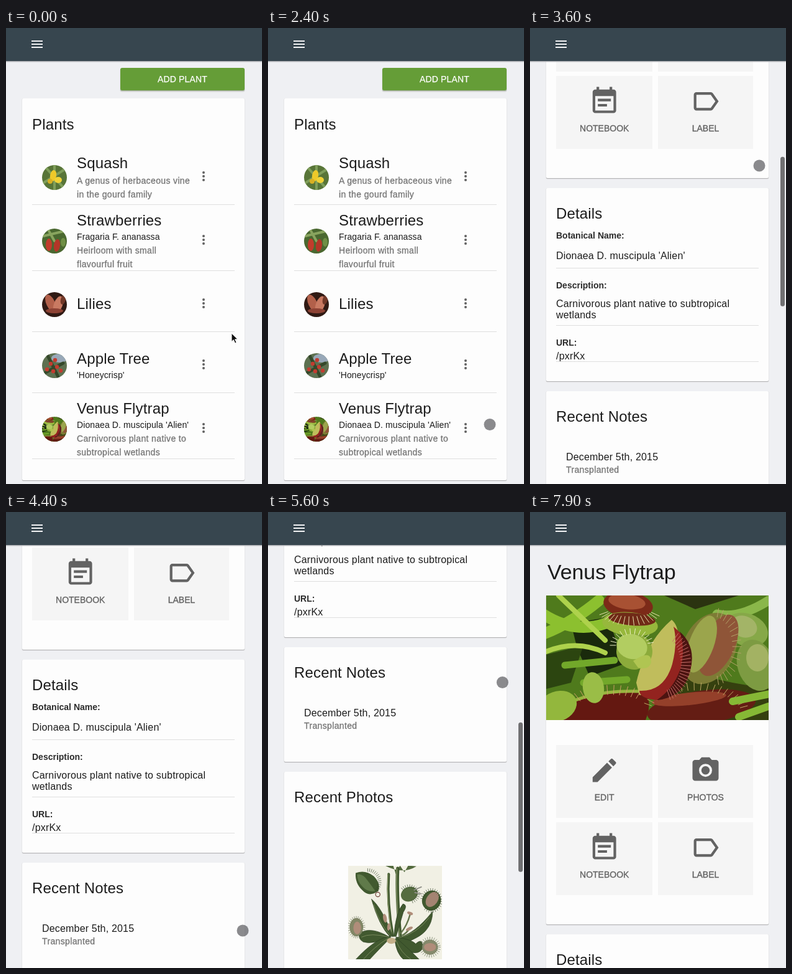
Recreate the animation shown at these times as an HTML page. Size 412 px wide and 732 px high, loop 8 s.

```html
<!DOCTYPE html>
<html lang="en">
<head>
<meta charset="utf-8">
<title>Plants</title>
<style>
  html, body { margin: 0; width: 100%; height: 100%; overflow: hidden; background: #eff0f3; }
  svg { display: block; width: 100vw; height: 100vh; }
  text { font-family: "Liberation Sans", Arial, sans-serif; fill: #1c1c1c; }
  .h1 { font-size: 34px; letter-spacing: -.1px; }
  .h2 { font-size: 24px; letter-spacing: .15px; }
  .body { font-size: 16px; letter-spacing: .18px; }
  .small { font-size: 14px; letter-spacing: .1px; }
  .bold { font-size: 14px; font-weight: bold; fill: #2c2c2c; }
  .note { font-size: 14px; letter-spacing: .36px; fill: #757575; stroke: #757575; stroke-width: .3px; }
  .tile { font-size: 14px; fill: #636363; stroke: #636363; stroke-width: .35px; text-anchor: middle; }
  .btn { font-size: 14px; letter-spacing: .14px; fill: #fff; stroke: #fff; stroke-width: .25px; text-anchor: middle; }
</style>
</head>
<body>
<svg id="stage" viewBox="0 0 412 732"></svg>
<script>
const LOOP = 8000;
const stage = document.getElementById('stage');

// Drawing helpers
const text = (cls, x, y, s) => `<text class="${cls}" x="${x}" y="${y}">${s}</text>`;
const rect = (x, y, w, h, fill, r = 0) =>
  `<rect x="${x}" y="${y}" width="${w}" height="${h}" rx="${r}" fill="${fill}"/>`;
const oval = (x, y, rx, ry, fill, turn = 0) =>
  `<ellipse rx="${rx}" ry="${ry}" fill="${fill}" transform="translate(${x} ${y}) rotate(${turn})"/>`;
const line = (d, color, w = 1) =>
  `<path d="${d}" fill="none" stroke="${color}" stroke-width="${w}" stroke-linecap="round"/>`;
const shape = (d, fill) => `<path d="${d}" fill="${fill}"/>`;
const rule = y => rect(42, y, 326, 1, '#dfdfdf');
const use = (id, x, y, w, h) => `<use href="#${id}" x="${x}" y="${y}" width="${w}" height="${h}"/>`;

const card = (top, bottom) =>
  rect(25.5, top, 359, bottom - top + 1.5, '#dcdcde', 2) +
  rect(26, top + 2, 358, bottom - top - 1, '#b4b4b6', 2) +
  rect(26, top, 358, bottom - top, '#fdfdfd', 2);

const button = (x, y, w, label) =>
  rect(x - .5, y + 1, w + 1, 37.5, '#d0d2d0', 3) + rect(x, y + 1, w, 36, '#a0ab96', 3) +
  rect(x, y, w, 36, '#659d37', 3) + text('btn', x + w / 2, y + 23, label);

// Teeth along an elliptic arc, angles in degrees
function teeth(x, y, rx, ry, from, to, count, len, color, w = 1) {
  let d = '';
  for (let i = 0; i < count; i++) {
    const a = (from + (to - from) * i / (count - 1)) * Math.PI / 180;
    const c = Math.cos(a), s = Math.sin(a);
    d += `M${(x + rx * c).toFixed(1)} ${(y + ry * s).toFixed(1)}l${(len * c).toFixed(1)} ${(len * s).toFixed(1)}`;
  }
  return line(d, color, w);
}

// Pictures
const flytrapPhoto = [
  rect(0, 0, 358, 200, '#4f7a1c'),
  shape('M40 45L100 35 125 110 70 130 50 85Z', '#1a2a0c'),
  shape('M190 0H310L240 22Z', '#2b3310'),
  shape('M0 95L60 80 40 140 0 150Z', '#2c4510'),
  shape('M210 120L300 140 358 150V200H180Z', '#35400f'),
  line('M-5 30Q45 62 95 45M-5 62Q40 45 85 8', '#8cc02f', 18),
  line('M20 0L95 72M0 90Q50 70 95 92', '#aed24c', 8),
  line('M30 112L110 104M60 140L130 135', '#72a82a', 11),
  line('M358 8Q310 38 275 30', '#8ab74a', 15),
  oval(322, 55, 36, 26, '#86a848', 20), oval(318, 50, 22, 17, '#a3b467', 20),
  oval(338, 112, 30, 42, '#7d9b42', -18), oval(340, 100, 18, 22, '#a3b263'),
  oval(262, 85, 42, 60, '#7d7c35', 25), oval(277, 80, 26, 53, '#8f5538', 25), oval(250, 78, 20, 48, '#9ba54c', 20),
  teeth(270, 82, 30, 48, -80, 80, 17, 14, '#b3a268'),
  oval(132, 15, 40, 21, '#7c2a18', 8), oval(130, 10, 30, 12, '#a85133', 8),
  oval(135, 46, 45, 19, '#97b83c', 6), oval(138, 38, 38, 10, '#702a17', 5),
  teeth(135, 22, 38, 12, 25, 160, 15, 14, '#e8e2ac'),
  shape('M0 190Q60 150 150 152Q175 162 160 200H0Z', '#641811'),
  line('M0 192Q60 150 152 154', '#98b43f', 5),
  teeth(105, 205, 80, 46, 190, 300, 17, 15, '#cf9f68'),
  oval(18, 178, 32, 24, '#93b73d', -20), oval(76, 148, 17, 25, '#9abd47', -8),
  oval(250, 180, 88, 27, '#641d14', -8), oval(230, 166, 60, 10, '#94402a', -6),
  teeth(240, 190, 75, 38, 200, 345, 20, 12, '#bfa966'),
  line('M300 170L360 158M310 195L358 178', '#86b835', 12),
  shape('M145 140Q160 75 202 39Q222 55 205 115Q195 155 150 160Z', '#c0bd5c'),
  shape('M205 50Q242 80 232 120Q220 165 178 168Q150 165 150 153Q190 155 203 110Q212 75 205 50Z', '#93231f'),
  shape('M215 58Q242 82 232 120Q220 165 178 168Q207 148 217 115Q224 85 215 58Z', '#4c1411'),
  teeth(185, 110, 32, 44, -55, 72, 23, 16, '#c8706a'),
  oval(142, 90, 29, 29, '#8cab3b', 15), oval(138, 82, 25, 20, '#b2cd61', 15),
  shape('M140 105Q170 85 169 108Q165 120 148 116Z', '#b0c552'),
  teeth(138, 80, 26, 18, 180, 350, 13, 9, '#eef0c8')
].join('');

const green = '#41592f', dark = '#26391f', pale = '#8c9a6b', pink = '#b08d7a';
const leaf = d => shape(d, green) + line(d, dark, 1);
const botanical = [
  rect(0, 0, 250, 250, '#f1f0e4'),
  shape('M98 0Q145 25 182 2L160 0 150 18 138 0 127 23 120 0Z', '#536a3e'),
  line('M132 8Q128 80 140 198', green, 9), line('M130 8Q126 80 138 198', pale, 2),
  line('M108 23Q103 100 119 186', green, 7), line('M106 23Q101 100 117 186', pale, 2),
  leaf('M112 190Q82 160 62 89Q90 112 118 186Z'),
  leaf('M122 188Q126 126 146 102Q160 105 147 124Q138 155 128 188Z'),
  leaf('M130 192Q175 185 225 122Q225 170 180 193Q150 210 136 198Z'),
  leaf('M110 190Q60 160 30 180Q26 195 40 203Q65 212 112 188Z'),
  leaf('M128 190Q170 197 180 208Q200 190 198 220Q190 237 165 230Q145 220 128 196Z'),
  leaf('M110 188Q70 195 18 252H55Q80 225 113 192Z'),
  leaf('M124 196Q128 235 150 252H192Q165 225 130 194Z'),
  line('M110 184Q82 150 68 104M136 192Q185 180 216 138M108 190Q60 178 36 190M106 194Q70 215 40 250M128 200Q140 232 168 250', pale, 1.2),
  line('M140 180Q157 160 165 130M145 185Q155 180 163 168', '#62734a', 4),
  oval(98, 140, 5, 12, pink, -10), oval(163, 168, 10, 4, pink, -25),
  oval(165, 127, 8, 4, pink, 20), oval(108, 163, 4, 10, pink, 5),
  oval(115, 200, 12, 8, '#c4b08a'),
  shape('M20 20Q45 10 68 28Q88 48 80 68Q55 85 38 66Q18 48 20 20Z', green),
  shape('M24 24Q38 20 52 40Q66 58 72 68Q52 72 38 56Q24 42 24 24Z', '#607a4a'),
  teeth(52, 44, 28, 28, -90, 40, 15, 8, dark),
  '<circle cx="79" cy="77" r="6" fill="none" stroke="#74443c" stroke-width="2"/>',
  oval(163, 76, 23, 19, '#566c40', -25), teeth(163, 76, 20, 17, -140, 70, 17, 8, dark),
  line('M176 65L195 57M178 72L195 75', '#909088', 3),
  oval(222, 93, 25, 27, green, 20), oval(224, 90, 15, 22, '#a48472', 35),
  teeth(222, 93, 21, 24, -170, 130, 25, 8, dark),
  oval(22, 164, 18, 24, '#828766'), oval(24, 166, 10, 17, pink), teeth(22, 164, 17, 23, 0, 350, 27, 6, '#505c40'),
  oval(218, 217, 21, 20, '#858a6c'), oval(218, 217, 16, 11, pink), teeth(218, 217, 20, 19, 0, 350, 27, 8, '#505c40')
].join('');

const thumbs = [
  rect(-20, -20, 40, 40, '#587538') + line('M-20 10L18 -14M-14 -16L16 18M0 -20V20', '#7f9e5a', 4) +
    oval(-2, -3, 5, 9, '#eec92a', 10) + oval(6, 4, 6, 5, '#f0d236') + oval(-7, 6, 4, 4, '#d8b024'),
  rect(-20, -20, 40, 40, '#4a6830') + line('M-18 -8L16 -16M-10 -18L0 0', '#88a45e', 4) +
    oval(-9, 6, 5, 10, '#c23c2c') + oval(4, 7, 5, 10, '#b33628', 8) + oval(14, 2, 4, 7, '#6f8f45'),
  rect(-20, -20, 40, 40, '#301a14') + oval(-6, -2, 7, 15, '#b2604a', -25) + oval(6, 0, 7, 14, '#c97a62', 20) +
    oval(0, 10, 14, 4, '#8d4234') + oval(14, -8, 4, 8, '#713828', 15),
  rect(-20, -20, 40, 40, '#5d7050') + oval(8, -12, 13, 7, '#98a8b8') + line('M-20 14L14 -4M-12 -18L6 18', '#34482a', 5) +
    [[-6, -3], [4, 2], [-2, 9], [10, 8], [-12, 6], [1, -9]].map(p => oval(p[0], p[1], 3.2, 3.2, '#c23c30')).join(''),
  use('flytrap', -20, -20, 40, 40)
];

const icons = {
  EDIT: 'M3 17.25V21h3.75L17.81 9.94l-3.75-3.75L3 17.25zM20.71 7.04a1 1 0 0 0 0-1.41l-2.34-2.34a1 1 0 0 0-1.41 0l-1.83 1.83 3.75 3.75 1.83-1.83z',
  PHOTOS: 'M9 2L7.17 4H4a2 2 0 0 0-2 2v12a2 2 0 0 0 2 2h16a2 2 0 0 0 2-2V6a2 2 0 0 0-2-2h-3.17L15 2zM12 7a5 5 0 1 1 0 10a5 5 0 1 1 0-10zM12 8.8a3.2 3.2 0 1 0 0 6.4a3.2 3.2 0 1 0 0-6.4z',
  NOTEBOOK: 'M17 10H7v2h10zM19 3h-1V1h-2v2H8V1H6v2H5a2 2 0 0 0-2 2v14a2 2 0 0 0 2 2h14a2 2 0 0 0 2-2V5a2 2 0 0 0-2-2zM19 19H5V8h14zM14 14H7v2h7z',
  LABEL: 'M17.63 5.84A2 2 0 0 0 16 5H5a2 2 0 0 0-2 2v10a2 2 0 0 0 2 2h11a2 2 0 0 0 1.63-.84L22 12zM16 17H5V7h11l3.55 5z'
};

const tile = (x, y, w, cx, label) =>
  rect(x, y, w, 117, '#f5f5f5') +
  `<path d="${icons[label]}" fill="#636363" fill-rule="evenodd" transform="translate(${cx - 25.2} ${y + 15.5}) scale(2.1)"/>` +
  text('tile', cx, y + 89, label);

// Screens
const plants = [
  { y: 240, rule: 283, title: ['Squash', 225], note: ['A genus of herbaceous vine', 250, 'in the gourd family'] },
  { y: 342, rule: 389, title: ['Strawberries', 317], latin: ['Fragaria F. ananassa', 340], note: ['Heirloom with small', 362, 'flavourful fruit'] },
  { y: 444, rule: 487, title: ['Lilies', 451] },
  { y: 542, rule: 585, title: ['Apple Tree', 539], latin: ["'Honeycrisp'", 562] },
  { y: 644, rule: 691, title: ['Venus Flytrap', 619], latin: ["Dionaea D. muscipula 'Alien'", 642], note: ['Carnivorous plant native to', 664, 'subtropical wetlands'] }
];

const plantRow = (p, i) =>
  `<g transform="translate(78 ${p.y})"><g clip-path="url(#round)">${thumbs[i]}</g></g>` +
  text('h2', 114, p.title[1], p.title[0]) +
  (p.latin ? text('small', 114, p.latin[1], p.latin[0]) : '') +
  (p.note ? text('note', 114, p.note[1], p.note[0]) + text('note', 114, p.note[1] + 22, p.note[2]) : '') +
  [-6, 0, 6].map(d => oval(318, p.y - 2 + d, 2, 2, '#636363')).join('') + rule(p.rule);

const listScreen = button(184, 64, 200, 'ADD PLANT') + card(113, 726) +
  text('h2', 42, 163, 'Plants') + plants.map(plantRow).join('');

const detailScreen = [
  text('h1', 28, 108, 'Venus Flytrap'),
  card(134, 662), use('flytrap', 26, 134, 358, 200),
  tile(42, 374, 155, 119.7, 'EDIT'), tile(206, 374, 153, 282.5, 'PHOTOS'),
  tile(42, 498, 155, 119.7, 'NOTEBOOK'), tile(206, 498, 153, 282.5, 'LABEL'),
  card(678, 988), text('h2', 42, 727, 'Details'),
  text('bold', 42, 759, 'Botanical Name:'), text('body', 42, 792, "Dionaea D. muscipula 'Alien'"), rule(806),
  text('bold', 42, 839, 'Description:'), text('body', 42, 869, 'Carnivorous plant native to subtropical'),
  text('body', 42, 887, 'wetlands'), rule(898),
  text('bold', 42, 931, 'URL:'), text('body', 42, 953, '/pxrKx'), rule(956),
  card(1004, 1188), text('h2', 42, 1053, 'Recent Notes'),
  text('body', 58, 1115, 'December 5th, 2015'), text('note', 58, 1135, 'Transplanted'),
  card(1204, 1933), text('h2', 42, 1253, 'Recent Photos'),
  use('botanical', 129, 1355, 151, 150), use('flytrap', 129, 1568, 151, 150)
].join('');

const photosScreen = [
  card(66, 199), text('h2', 42, 115, 'Upload or capture a photo'),
  button(50, 136, 166, 'TAKE/UPLOAD PHOTO'), rect(42, 178, 326, 5, '#c7d3e0'),
  card(207, 960), text('h2', 56, 256, 'Photos of Venus Flytrap'),
  use('botanical', 87, 300, 250, 250), use('flytrap', 87, 613, 250, 250)
].join('');

stage.innerHTML = `
  <defs>
    <clipPath id="round"><circle r="20"/></clipPath>
    <symbol id="flytrap" viewBox="0 0 358 200" preserveAspectRatio="xMidYMid slice">${flytrapPhoto}</symbol>
    <symbol id="botanical" viewBox="0 0 250 250" preserveAspectRatio="xMidYMid slice">${botanical}</symbol>
  </defs>
  ${rect(0, 0, 412, 732, '#eff0f3')}
  <g id="list">${listScreen}</g><g id="detail">${detailScreen}</g><g id="photos">${photosScreen}</g>
  ${rect(0, 53, 412, 1.5, '#b2b4b8')}${rect(0, 0, 412, 53, '#37464f')}
  ${[20, 25, 30].map(y => rect(41, y, 18, 2, '#f0f1f3')).join('')}
  <rect id="bar" x="403" width="7" rx="3.5" fill="#707072"/>
  <circle id="touch" r="9.5" fill="#4a4a4e" fill-opacity=".64"/>
  <path id="arrow" d="M0 0V13.5L3.2 10.6 5.6 16 8 15 5.6 9.8H10Z" fill="#0c0c0c" stroke="#fff" stroke-width="1"/>`;

const [list, detail, photos, bar, touch, arrow] =
  ['list', 'detail', 'photos', 'bar', 'touch', 'arrow'].map(id => document.getElementById(id));

// Motion: rows of [time, ...values], eased between rows
const pointer = [
  [0, 363, 490], [400, 363, 500], [1400, 359, 612], [1800, 357, 634], [2850, 357, 638],
  [3080, 372, 665], [3600, 369, 221], [3750, 369, 200], [4400, 381, 672], [4500, 382, 672],
  [4900, 382, 474], [5250, 380, 230], [5500, 378, 230], [6000, 372, 640], [6300, 315, 485], [6650, 315, 492],
  [7050, 150, -20]
];
const detailScroll = [
  [3060, 0], [3100, 1], [3600, 421], [3750, 441], [4500, 441], [4900, 636], [5250, 880], [5500, 880], [6000, 0]
];

function at(rows, t) {
  const next = rows.findIndex(r => r[0] > t);
  if (next === 0) return rows[0].slice(1);
  if (next < 0) return rows[rows.length - 1].slice(1);
  const a = rows[next - 1], b = rows[next];
  const u = (t - a[0]) / (b[0] - a[0]), e = u * u * (3 - 2 * u);
  return a.slice(1).map((v, i) => v + (b[i + 1] - v) * e);
}

const show = (el, on) => el.setAttribute('display', on ? 'inline' : 'none');
const move = (el, x, y) => el.setAttribute('transform', `translate(${x} ${y})`);

function draw(t) {
  const screen = t < 2850 ? list : t < 6450 || t >= 7200 ? detail : photos;
  [list, detail, photos].forEach(s => show(s, s === screen));

  const scroll = screen === detail ? Math.round(at(detailScroll, t)[0]) : 0;
  move(screen, 0, -scroll);

  show(bar, (t > 3120 && t < 4050) || (t > 4500 && t < 6250));
  bar.setAttribute('y', 56 + scroll * .358);
  bar.setAttribute('height', 240);

  const [x, y] = at(pointer, t);
  show(arrow, t < 400);
  show(touch, t >= 400 && t < 7050);
  move(arrow, x, y);
  move(touch, x, y);
}

const start = performance.now();
function tick() {
  draw((performance.now() - start) % LOOP);
  requestAnimationFrame(tick);
}
draw(0);
requestAnimationFrame(tick);
</script>
</body>
</html>
```
